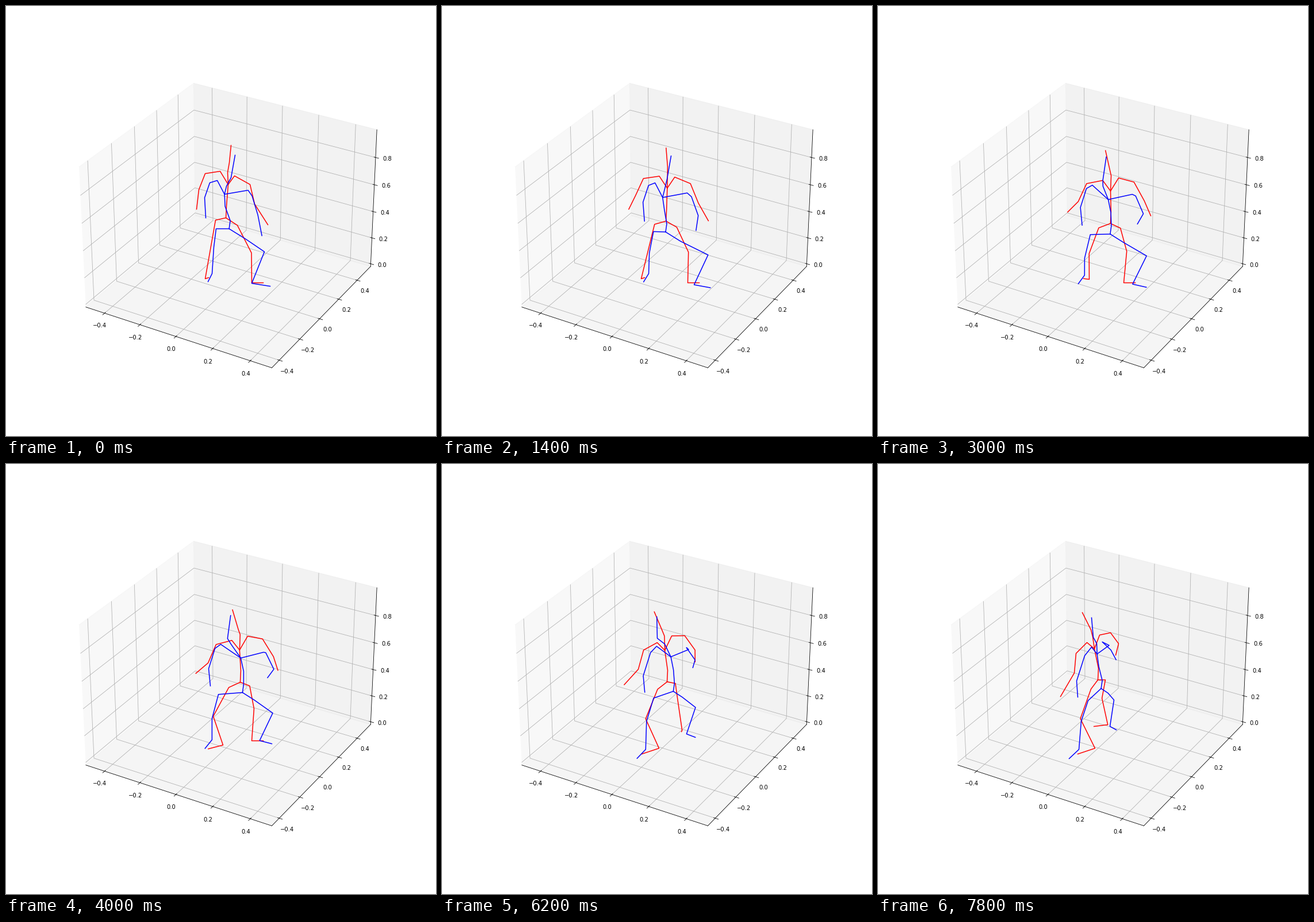
Recreate the animation shown at these times as a matplotlib script. Size 748x748 px, loop 8000 ms.

```python
import numpy as np
import matplotlib.pyplot as plt
from matplotlib.animation import FuncAnimation

SIZE, DPI = 748, 72
FRAMES, STEP_MS = 40, 200
U = np.linspace(0, 1, FRAMES)   # progress through the clip


def path(start, *rest):
    """Parabola through start, (middle,) end; a straight glide with two points."""
    a, c = np.array(start, float), np.array(rest[-1], float)
    b = np.array(rest[0], float) if len(rest) == 2 else (a + c) / 2
    u = U if a.ndim == 0 else U[:, None]
    return a * (1 - 2 * u) * (1 - u) + b * 4 * u * (1 - u) + c * u * (2 * u - 1)


def glide(a, b, t0, t1):
    """Smooth step from a to b between progress t0 and t1."""
    t = np.clip((U - t0) / (t1 - t0), 0, 1)
    return a + (b - a) * t * t * (3 - 2 * t)


def sway(base, reach, lag):
    return base + reach * np.sin(np.pi * (U - lag)) ** 2


def xy(x, y):
    return np.column_stack(np.broadcast_arrays(x, y))


fig = plt.figure(figsize=(SIZE / DPI, SIZE / DPI), dpi=DPI)
room = fig.add_subplot(projection="3d")
half = 0.49 * 25 / 24
room.set_xlim(0.0025 - half, 0.0025 + half)
room.set_ylim(0.04 - half, 0.04 + half)
room.set_zlim(0.49 - half, 0.49 + half)
side_ticks = [-0.4, -0.2, 0.0, 0.2, 0.4]
room.set_xticks(side_ticks)
room.set_yticks(side_ticks)
room.set_zticks([0.0, 0.2, 0.4, 0.6, 0.8])
room.tick_params(pad=4.5)

# Flat layer in pixel units for the two bodies.
stage = fig.add_axes([0, 0, 1, 1], zorder=5)
stage.set_xlim(-0.5, SIZE - 0.5)
stage.set_ylim(SIZE - 0.5, -0.5)
stage.axis("off")

limbs = []


def limb(color, *joints):
    line, = stage.plot([], [], color=color, lw=1.5)
    limbs.append((line, np.stack(joints, axis=1)))


def red_body():
    pelvis = xy(sway(382, 25, 0), path(368, 379, 375))
    chest = pelvis + path((4, -58), (-6, -54))

    limb("red", pelvis, pelvis + (1, -20), chest,
         pelvis + path((3, -79), (0, -83), (-9, -75)),
         pelvis + path((6, -96), (-12, -87)),
         pelvis + path((9, -126), (-13, -126), (-27, -117)))
    limb("red", chest,
         pelvis + path((-10, -81), (-19, -65)),
         pelvis + path((-36, -77), (-42, -66), (-38, -46)),
         pelvis + path((-47, -49), (-56, -34), (-41, -12)),
         pelvis + path((-51, -15), (-77, -16), (-65, 29)))
    limb("red", chest,
         pelvis + path((15, -73), (13, -80), (3, -78)),
         pelvis + path((42, -58), (39, -75), (22, -82)),
         pelvis + path((50, -24), (58, -44), (36, -63)),
         pelvis + path((73, 12), (66, -20), (31, -43)))

    # One foot steps forward, then the other lifts; knees bend off mid-leg.
    hip = pelvis + path((-18, 4), (-20, 9), (-12, 16))
    ankle = xy(glide(346, 377, 0.18, 0.51), glide(474, 494, 0.35, 0.6))
    knee = (hip + ankle) / 2 + xy(glide(0, -22, 0.3, 0.5), 0)
    toe = ankle + xy(glide(6, -30, 0.2, 0.6), glide(-2, 10, 0.35, 0.6))
    limb("red", pelvis, hip, knee, ankle, toe)

    hip = pelvis + path((20, 13), (13, 0))
    ankle = xy(glide(427, 393, 0.6, 1.15), glide(481, 453, 0.52, 0.98))
    knee = (hip + ankle) / 2 + path((12, -2), (6, -8), (-8, -7))
    toe = ankle + xy(glide(20, -24, 0.6, 1), glide(0, 3, 0.6, 0.9))
    limb("red", pelvis, hip, knee, ankle, toe)


def blue_body():
    pelvis = xy(sway(386, 26, 0.08), path(387, 397, 390))
    chest = pelvis + path((-8, -60), (-3, -60), (-7, -60))

    limb("blue", pelvis, pelvis + (2, -14),
         pelvis + path((-7, -39), (2, -37), (-4, -38)), chest,
         path((383, 313), (391, 313), (380, 312)),
         xy(glide(391, 374, 0.35, 0.75), path(298, 303, 301)),
         xy(glide(398, 371, 0.3, 0.9), path(259, 267)))
    limb("blue", chest,
         path((367, 303), (373, 313), (371, 318)),
         path((354, 307), (363, 320), (359, 333)),
         path((345, 333), (352, 355), (345, 377)),
         path((347, 368), (355, 385), (347, 405)))
    limb("blue", chest,
         pelvis + path((33, -67), (37, -70), (14, -75)),
         pelvis + path((40, -57), (41, -69), (2, -81)),
         pelvis + path((50, -24), (55, -40), (17, -67)),
         pelvis + path((57, 12), (44, -25), (26, -50)))

    ankle = xy(path(358, 358, 349), glide(465, 496, 0.3, 0.75))
    limb("blue", pelvis,
         path((365, 387), (369, 400), (365, 411)),
         path((361, 419), (358, 442), (353, 447)),
         ankle, ankle + path((-7, 14), (-17, 16)))

    ankle = path((427, 482), (441, 481), (403, 456))
    limb("blue", pelvis,
         pelvis + path((29, 18), (12, 8)),
         path((449, 427), (464, 433), (410, 410)),
         ankle, ankle + path((32, 5), (11, 6)))


red_body()
blue_body()


def update(frame):
    for line, track in limbs:
        line.set_data(track[frame].T)
    return [line for line, _ in limbs]


anim = FuncAnimation(fig, update, frames=FRAMES, interval=STEP_MS,
                     init_func=lambda: update(0), repeat=True, repeat_delay=0)
plt.show()
```
